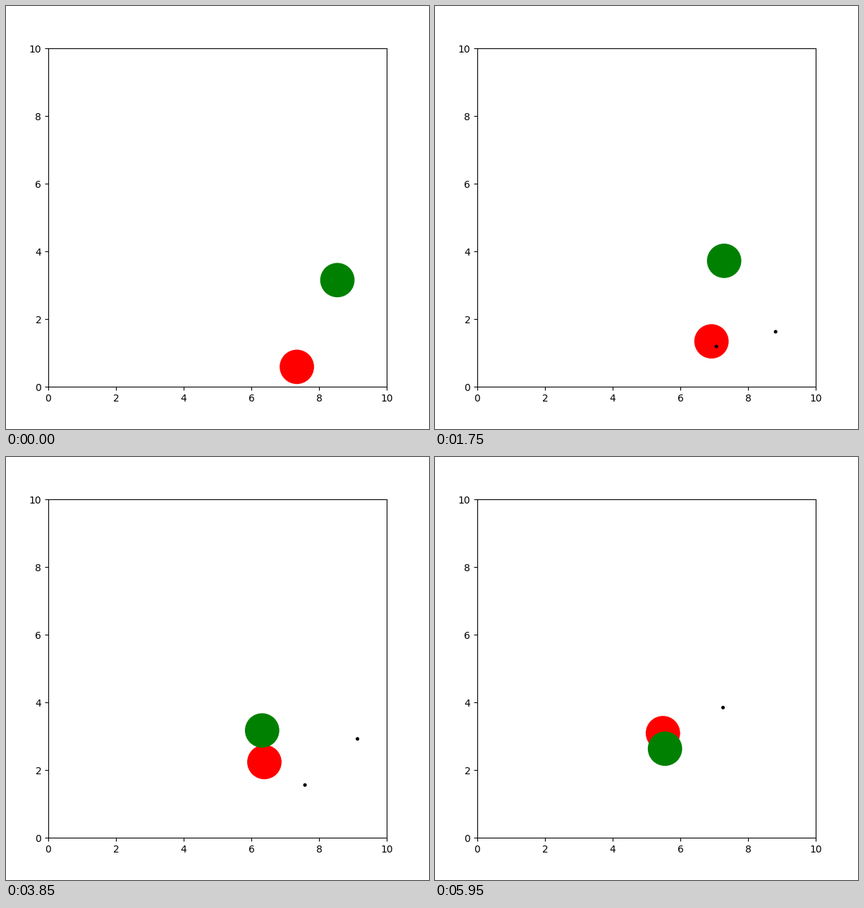
These frames come from a looping animation (600x600 px, 6300 ms). A matplotlib script:

```python
import numpy as np
import matplotlib.pyplot as plt
from matplotlib.animation import FuncAnimation
from matplotlib.patches import Circle

FRAMES, INTERVAL = 18, 350
AGENT_RADIUS, SHOT_RADIUS = 0.508, 0.053
SHOT_EVERY, SHOT_SPEED = 4, 0.45
SHOT_ANGLES = np.radians([35.2, 39.85, -15.0, 55.25])

# Waypoints (step, x, y); agents walk straight between them
RED = [(0, 7.345, 0.587), (2, 7.35, 0.89), (5, 6.92, 1.34), (8, 6.715, 1.79),
       (11, 6.385, 2.235), (14, 5.937, 2.63), (17, 5.485, 3.09)]
GREEN = [(0, 8.542, 3.15), (2, 8.042, 3.43), (5, 7.294, 3.72), (7, 6.907, 3.52),
         (9, 6.545, 3.12), (11, 6.318, 3.17), (13, 6.025, 3.267),
         (14, 6.047, 3.185), (17, 5.546, 2.63)]

fig = plt.figure(figsize=(6, 6), dpi=100)
ax = fig.add_axes([0.1, 0.1, 0.8, 0.8])
ax.set(xlim=(0, 10), ylim=(0, 10))


def disc(radius, color):
    return ax.add_patch(Circle((0, 0), radius, color=color, linewidth=0))


def walk(path, step):
    steps, xs, ys = zip(*path)
    return np.array([np.interp(step, steps, xs), np.interp(step, steps, ys)])


red = disc(AGENT_RADIUS, "red")
shots = [disc(SHOT_RADIUS, "black") for _ in SHOT_ANGLES]
green = disc(AGENT_RADIUS, "green")


def update(step):
    red.center = walk(RED, step)
    green.center = walk(GREEN, step)
    for i, (shot, angle) in enumerate(zip(shots, SHOT_ANGLES)):
        # A shot leaves from where red stood, one step before it shows
        origin = i * SHOT_EVERY
        travel = SHOT_SPEED * (step - origin - 1)
        pos = walk(RED, origin) + travel * np.array([np.cos(angle), np.sin(angle)])
        shot.center = pos
        shot.set_visible(bool(step > origin and np.all((pos >= 0) & (pos <= 10))))
    return [red, *shots, green]


anim = FuncAnimation(fig, update, frames=FRAMES, interval=INTERVAL,
                     repeat=True, repeat_delay=0)
plt.show()
```
